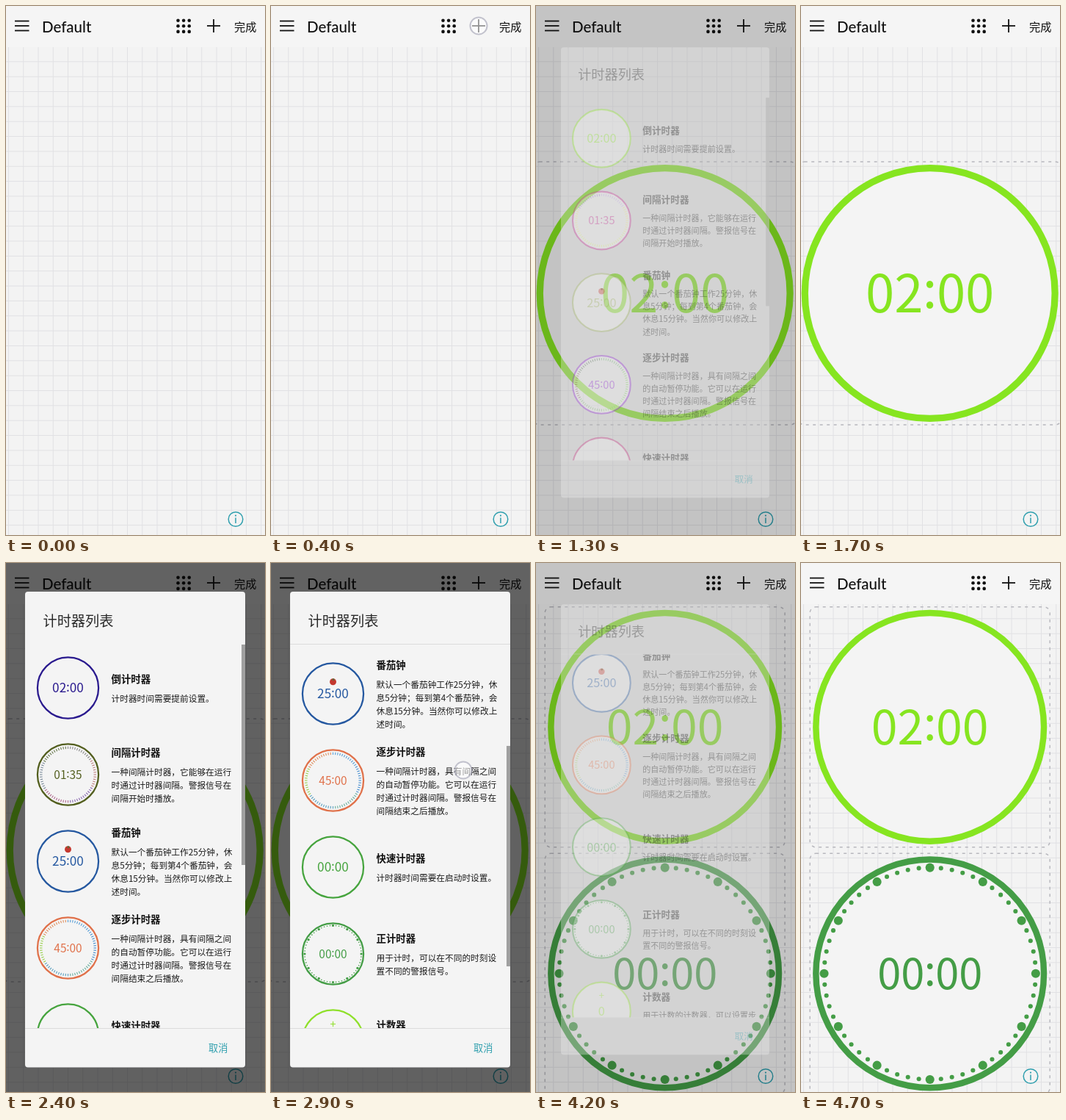
These frames come from a looping animation (353x720 px, 4.8 s). An HTML page with a canvas:

```html
<!DOCTYPE html>
<html lang="zh-CN">
<head>
<meta charset="utf-8">
<style>
html, body { margin: 0; width: 100%; height: 100%; overflow: hidden; background: #f3f3f3; }
canvas { display: block; width: 353px; height: 720px; }
</style>
</head>
<body>
<canvas id="stage"></canvas>
<script>
const W = 353, H = 720, LOOP = 4800, STEP = 100;
const canvas = document.getElementById('stage');
const ctx = canvas.getContext('2d');
const dpr = window.devicePixelRatio || 1;
canvas.width = W * dpr;
canvas.height = H * dpr;

const CJK = '"Noto Sans CJK SC", "Noto Sans CJK", "Noto Sans CJK JP", sans-serif';
const LIME = '#86e520', GREEN = '#449d46', TEAL = '#2f9fae';
const BIG = 40.4, MEDIUM = 36.2;

const rows = [
  { title: '倒计时器', time: '02:00', lines: ['计时器时间需要提前设置。'] },
  { title: '间隔计时器', time: '01:35', size: MEDIUM,
    lines: ['一种间隔计时器，它能够在运行', '时通过计时器间隔。警报信号在', '间隔开始时播放。'] },
  { title: '番茄钟', time: '25:00', tomato: true,
    lines: ['默认一个番茄钟工作25分钟，休', '息5分钟；每到第4个番茄钟，会', '休息15分钟。当然你可以修改上', '述时间。'] },
  { title: '逐步计时器', time: '45:00', size: MEDIUM,
    lines: ['一种间隔计时器，具有间隔之间', '的自动暂停功能。它可以在运行', '时通过计时器间隔。警报信号在', '间隔结束之后播放。'] },
  { title: '快速计时器', time: '00:00', lines: ['计时器时间需要在启动时设置。'] },
  { title: '正计时器', time: '00:00', size: MEDIUM, dots: true,
    lines: ['用于计时，可以在不同的时刻设', '置不同的警报信号。'] },
  { title: '计数器', time: '0', counter: true,
    lines: ['用于计数的计数器，可以设置步', '长。'] }
];

const themes = [
  { rings: [LIME, '#c0248e', '#98ad58', '#8a1cd0', '#c02878', GREEN, '#8fe02a'],
    ticks: { 1: ['#b9a0e0', '#e8e070', '#d5ee70', '#d5ee70', '#e8e070', '#9a70d0'],
             3: ['#5fae5f', '#6fce4a', '#7fe05a', '#6fb060', '#7a4a3a', '#3a5a3a'] } },
  { rings: ['#2a1a8e', '#535f1f', '#2558a0', '#e0714a', '#46a43e', GREEN, '#8fe02a'],
    ticks: { 1: ['#8a8a8a', '#c08080', '#8a6ab0', '#b06a90', '#7a8a9a', '#6a7a50'],
             3: ['#5aa0d8', '#4a90d0', '#6ab0a0', '#5aa0c0', '#9ad050', '#e09060'] } }
];

// Linear interpolation through [time, value] points
function track(t, points) {
  if (t <= points[0][0]) return points[0][1];
  for (let i = 1; i < points.length; i++) {
    const [t0, a] = points[i - 1], [t1, b] = points[i];
    if (t <= t1) return a + (b - a) * (t - t0) / (t1 - t0);
  }
  return points[points.length - 1][1];
}

function text(str, x, y, size, color, align = 'left', weight = 400) {
  ctx.font = `${weight} ${size}px ${CJK}`;
  ctx.textAlign = align;
  ctx.fillStyle = color;
  ctx.fillText(str, x, y + size * 0.37);
}

function line(x0, y0, x1, y1, color, width) {
  ctx.strokeStyle = color;
  ctx.lineWidth = width;
  ctx.beginPath();
  ctx.moveTo(x0, y0);
  ctx.lineTo(x1, y1);
  ctx.stroke();
}

function disc(x, y, r, fill, stroke, width) {
  ctx.beginPath();
  ctx.arc(x, y, r, 0, Math.PI * 2);
  if (fill) { ctx.fillStyle = fill; ctx.fill(); }
  if (stroke) { ctx.strokeStyle = stroke; ctx.lineWidth = width; ctx.stroke(); }
}

// Minutes and seconds around a colon that sits at mid height
function digits(time, size, color) {
  const [minutes, seconds] = time.split(':');
  if (!seconds) return text(time, 0, 0, size, color, 'center');
  text(minutes, -size * 0.13, 0, size, color, 'right');
  text(':', 0, -size * 0.09, size, color, 'center');
  text(seconds, size * 0.13, 0, size, color);
}

// Timer face drawn in units where the outer radius is 100
function clock(x, y, radius, row, color, ticks) {
  ctx.save();
  ctx.translate(x, y);
  ctx.scale(radius / 100, radius / 100);
  disc(0, 0, 97.4, '#f4f4f4', color, 5.3);
  digits(row.time, row.size || BIG, color);
  if (row.counter) {
    text('+', 0, -52, 34, color, 'center');
    text('−', 0, 52, 34, color, 'center');
  }
  if (row.tomato) {
    disc(0, -38, 10.5, '#c4382e');
    disc(1, -45, 3.5, '#5d6a3a');
  }
  if (row.dots) {
    for (let i = 0; i < 60; i++) {
      const a = i * Math.PI / 30;
      disc(90.4 * Math.sin(a), -90.4 * Math.cos(a), i % 5 ? 1.9 : 3.8, color);
    }
  }
  if (ticks) {
    for (let i = 0; i < 72; i++) {
      const a = i * Math.PI / 36, s = Math.sin(a), c = -Math.cos(a);
      line(82 * s, 82 * c, 90 * s, 90 * c, ticks[Math.floor(i / 12)], 2.6);
    }
  }
  ctx.restore();
}

function widget(y, radius, row, color) {
  const x = 175.7, half = radius + 4;
  ctx.setLineDash([4, 5.5]);
  ctx.strokeStyle = '#b8b8be';
  ctx.lineWidth = 1.5;
  ctx.beginPath();
  ctx.roundRect(x - half, y - half, half * 2, half * 2, 8);
  ctx.stroke();
  ctx.setLineDash([]);
  clock(x, y, radius, row, color);
}

function page(count) {
  ctx.fillStyle = '#f3f3f3';
  ctx.fillRect(0, 0, W, H);
  for (let x = 3.5; x < W; x += 20.25) line(x, 56, x, H, '#e1e1e4', 1);
  for (let y = 75.8; y < H; y += 20.35) line(0, y, W, y, '#e1e1e4', 1);

  if (count === 1) widget(391, 175, rows[0], LIME);
  if (count === 2) {
    widget(223.3, 159.5, rows[0], LIME);
    widget(558.8, 159.5, rows[5], GREEN);
  }

  ctx.fillStyle = '#f5f5f5';
  ctx.fillRect(0, 0, W, 56);
  for (const y of [20.5, 27, 33.5]) line(12, y, 31.5, y, '#111', 1.8);
  ctx.font = '500 20.5px Lato, sans-serif';
  ctx.textAlign = 'left';
  ctx.fillStyle = '#111';
  ctx.fillText('Default', 49, 35.5);
  for (let i = 0; i < 9; i++) disc(234.5 + i % 3 * 7.6, 19.7 + Math.floor(i / 3) * 7.6, 2.3, '#111');
  line(274, 27, 292, 27, '#111', 1.8);
  line(283, 18, 283, 36, '#111', 1.8);
  text('完成', 311, 28.5, 15.2, '#111');

  disc(313, 698.5, 9.8, '#f3f3f3', TEAL, 1.5);
  disc(313, 693.6, 1.1, TEAL);
  line(313, 696.5, 313, 704, TEAL, 1.5);
}

function dialog(alpha, scroll, bar, theme) {
  ctx.save();
  ctx.globalAlpha = alpha;
  ctx.fillStyle = 'rgba(0,0,0,.6)';
  ctx.fillRect(0, 0, W, H);

  const zoom = 0.92 + 0.08 * alpha;
  ctx.translate(176, 362);
  ctx.scale(zoom, zoom);
  ctx.translate(-176, -362);
  ctx.fillStyle = '#f4f4f4';
  ctx.beginPath();
  ctx.roundRect(26, 39, 300, 647.5, 4);
  ctx.fill();
  text('计时器列表', 50.5, 78.5, 19.2, '#2a2a2a');

  ctx.save();
  ctx.beginPath();
  ctx.rect(26, 111, 300, 522);
  ctx.clip();
  rows.forEach((row, i) => {
    const y = 170 + 118 * i - scroll, n = row.lines.length;
    clock(84.5, y, 42.7, row, theme.rings[i], theme.ticks[i]);
    text(row.title, 143.5, y - 3 - 9 * n, 13.4, '#111', 'left', 700);
    row.lines.forEach((str, k) => text(str, 143.5, y + 24 - 9 * n + 18 * k, 11.7, '#1c1c1c'));
  });
  ctx.globalAlpha = alpha * bar;
  ctx.fillStyle = '#a0a0a0';
  ctx.fillRect(321, 111 + scroll * 0.605, 5, 300);
  ctx.restore();

  if (scroll > 0) line(26, 110.5, 326, 110.5, '#dcdcdc', 1);
  line(26, 633.5, 326, 633.5, '#dcdcdc', 1);
  text('取消', 276, 660.5, 13.2, TEAL);
  ctx.restore();
}

function touch(x, y) {
  disc(x, y, 11.5, 'rgba(255,255,255,.55)', 'rgba(150,150,170,.55)', 2);
}

function draw(t) {
  const scroll = track(t, [[2600, 0], [2700, 70], [2800, 165], [2900, 228], [3000, 246], [3100, 254]]);
  const first = t < 1500;
  const alpha = first
    ? track(t, [[400, 0], [700, 1], [1100, 1], [1400, 0]])
    : track(t, [[2000, 0], [2300, 1], [4000, 1], [4300, 0]]);
  const bar = track(t, [[3200, 1], [3600, 0]]);

  page(t < 1200 ? 0 : t < 4200 ? 1 : 2);
  if (alpha > 0) dialog(alpha, first ? 0 : scroll, bar, themes[first ? 0 : 1]);

  const during = (a, b) => t >= a && t < b;
  if (during(300, 500) || during(1900, 2100)) touch(283, 27);
  if (during(1000, 1200)) touch(230, 172);
  if (during(2600, 3200)) touch(262, 510 - scroll);
  if (during(3800, 4100)) touch(252, 511);
}

function tick() {
  const t = performance.now() % LOOP;
  ctx.setTransform(dpr, 0, 0, dpr, 0, 0);
  draw(Math.floor(t / STEP) * STEP);
  requestAnimationFrame(tick);
}
tick();
</script>
</body>
</html>
```
